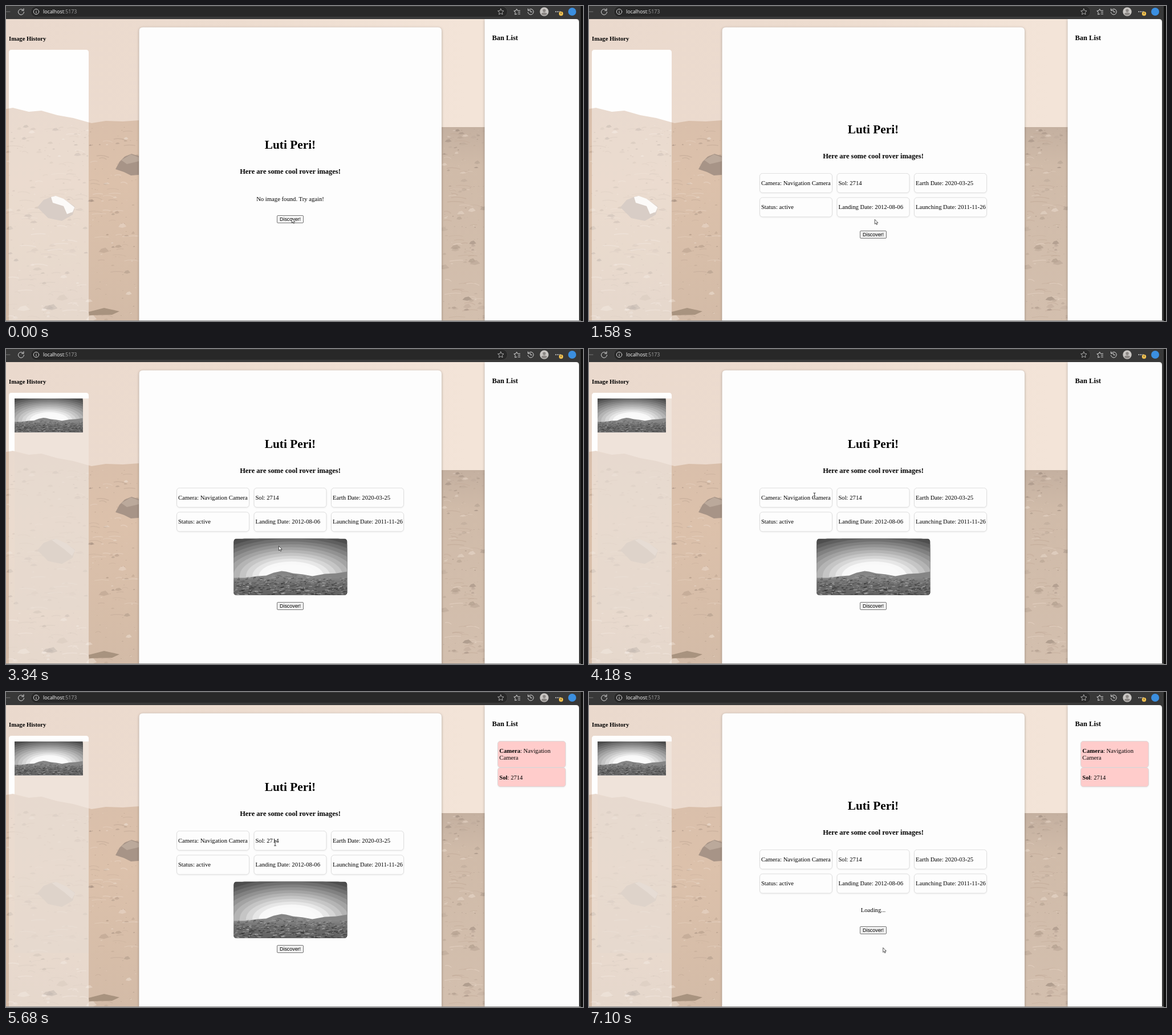
Write an HTML page that moves like this. It is 1012 px wide and 554 px high and loops after 8 s.

```html
<!DOCTYPE html>
<html lang="en">
<head>
<meta charset="utf-8">
<title>Rover images</title>
<style>
  html, body { margin: 0; width: 100%; height: 100%; overflow: hidden; background: #383838; }
  svg { display: block; width: 1012px; height: 554px; }
  text { font: 10.67px "Liberation Serif", "Times New Roman", serif; fill: #000; }
  .b { font-weight: bold; }
  .h1 { font-size: 21.33px; font-weight: bold; }
  .h3 { font-size: 12.48px; font-weight: bold; }
  .mid { text-anchor: middle; }
  .url { font: 8.8px "Open Sans", sans-serif; fill: #fff; }
  .btn { font: 8.89px "Liberation Sans", Arial, sans-serif; }
  .icon { fill: none; stroke: #d8d8d8; stroke-width: 1; stroke-linecap: round; stroke-linejoin: round; }
  .panel { filter: drop-shadow(0 1px 2px rgba(0, 0, 0, .28)); }
  .card { stroke: #d6d6d6; stroke-width: .8; filter: drop-shadow(0 1px 1px rgba(0, 0, 0, .06)); }
</style>
</head>
<body>
<svg viewBox="0 0 1012 554">
  <defs>
    <linearGradient id="sky">
      <stop offset="0" stop-color="#ead9cd"/>
      <stop offset=".4" stop-color="#eddccf"/>
      <stop offset=".8" stop-color="#f3e4d8"/>
    </linearGradient>
    <linearGradient id="soil" x2="0" y2="1">
      <stop offset="0" stop-color="#d9bfab"/>
      <stop offset=".35" stop-color="#dcc1ab"/>
      <stop offset="1" stop-color="#d3bba7"/>
    </linearGradient>
    <linearGradient id="plain" x2="0" y2="1">
      <stop offset="0" stop-color="#c4b0a0"/>
      <stop offset=".2" stop-color="#d0bba9"/>
      <stop offset="1" stop-color="#d3bfae"/>
    </linearGradient>
    <linearGradient id="dust" x2="0" y2="1">
      <stop offset="0" stop-color="#8a8a8a"/>
      <stop offset=".4" stop-color="#6c6c6c"/>
      <stop offset="1" stop-color="#626262"/>
    </linearGradient>
    <clipPath id="frame"><rect width="199" height="99.5" rx="5"/></clipPath>
    <clipPath id="thumb"><rect width="199" height="99.5"/></clipPath>
    <g id="photo"></g>
  </defs>

  <rect y="23" width="1005" height="531" fill="url(#sky)"/>
  <path d="M5 554V82Q5 77 10 77H140Q145 77 145 82V554Z" fill="#fdfdfd"/>
  <rect class="late" x="15" y="87" width="130" height="372" fill="#e3cfbf"/>
  <path d="M0 181L12 179L40 186L62 184L90 192L118 197L150 206L175 202L205 203L233 201V554H0Z" fill="url(#soil)"/>
  <rect x="764" y="213" width="76" height="341" fill="url(#plain)"/>
  <g id="rocks"></g>
  <path d="M192 287L199 274L208 265L220 260L233 264V297L219 298L207 292Z" fill="#a79487"/>
  <path d="M202 271L219 261L233 266V273L212 278Z" fill="#bba99b"/>
  <path d="M145 538L172 531L199 537L186 543L146 544Z" fill="#a8937f"/>
  <path d="M55 354L66 341L84 334L104 341L121 353L117 367L98 378L74 373Z" fill="#bba99c"/>
  <path d="M80 336L88 334L106 342L121 354L116 364L102 352Z" fill="#d5c8bd"/>
  <path d="M5 554V82Q5 77 10 77H140Q145 77 145 82V554Z" fill="#fff" opacity=".42"/>
  <path class="early" d="M79 336L87 334L101 339L120 354L117 362L107 366L101 352L82 346Z" fill="#fcfaf8"/>
  <path class="late" d="M15 182L40 186L62 184L90 192L118 197L145 205V459H15Z" fill="#e5d9cf" opacity=".5"/>
  <text class="b" x="5" y="60.5">Image History</text>
  <use class="late" href="#photo" transform="translate(15 87) scale(.602 .596)" clip-path="url(#thumb)"/>

  <path class="panel" d="M233.500 560V44Q233.500 37.500 240 37.500H757.500Q764 37.500 764 44V560Z" fill="#fdfdfd"/>
  <path class="panel" d="M839.500 560V23H1000Q1005 23 1005 28V560Z" fill="#fdfdfd"/>
  <text class="h3" x="852.500" y="60">Ban List</text>

  <g id="main">
    <text class="h1 mid" x="498.500" y="251.300">Luti Peri!</text>
    <text class="h3 mid" x="498.500" y="295">Here are some cool rover images!</text>
    <g id="facts"></g>
  </g>
  <text id="note" class="mid" x="498.500"></text>
  <g id="shot" transform="translate(399.300 333.500)"><use href="#photo" clip-path="url(#frame)"/></g>
  <g id="button">
    <rect x="475.500" y=".5" width="46" height="13" rx="1.500" stroke="#767676"/>
    <text class="btn mid" x="498.500" y="10">Discover!</text>
  </g>

  <g id="ban1">
    <rect class="card" x="862.500" y="86.500" width="119" height="46" rx="4.500" fill="#ffcccb"/>
    <text x="865.300" y="107"><tspan class="b">Camera</tspan>: Navigation</text>
    <text x="865.300" y="119">Camera</text>
  </g>
  <g id="ban2">
    <rect class="card" x="862.500" y="133" width="119" height="33.500" rx="4.500" fill="#ffcccb"/>
    <text x="865.300" y="153.500"><tspan class="b">Sol</tspan>: 2714</text>
  </g>

  <path d="M0 0H1012V554H1005V28Q1005 23 1000 23H0Z" fill="#383838"/>
  <rect x="1008" width="4" height="554" fill="#101010"/>
  <rect y="553" width="1008" height="1" fill="#8c8c8c"/>
  <rect x="43.500" y=".5" width="836" height="19" rx="9.500" fill="#282828" stroke="#4a4a4a" stroke-width=".7"/>
  <text class="url" x="65" y="13.200">localhost<tspan fill="#a8a8a8">:5173</tspan></text>
  <g class="icon">
    <path d="M-3 10H7M0 6L-4 10L0 14" stroke="#777"/>
    <path d="M30.500 7.500A5 5 0 1 0 31.500 10.500M31 4.500V8H27.500"/>
    <circle cx="53" cy="10" r="4.700"/>
    <path d="M53 9.500V12.500M53 7.500V7.600"/>
    <path d="M867.800 4.800L869.400 8.200L873 8.600L870.300 11.200L871 14.900L867.800 13L864.600 14.900L865.300 11.200L862.600 8.600L866.200 8.200Z" stroke="#aaa"/>
    <path d="M896 14L892.600 14.900L893.300 11.200L890.900 8.700L894.200 8.200L895.600 5L897.200 8.200H901.500M898.500 11H901.500M898.500 14H901.500"/>
    <path d="M916 7.500A5 5 0 1 1 915.300 11M915.500 4.800V8H918.700M920 7.500V10.500H922.500"/>
  </g>
  <circle cx="944" cy="10" r="7.700" fill="#c9c6c3"/>
  <path d="M939 14.500Q939 11.500 944 11.500Q949 11.500 949 14.500Q944 18.500 939 14.500Z" fill="#8b8784"/>
  <circle cx="944" cy="8" r="2.700" fill="#8b8784"/>
  <g fill="#ddd"><circle cx="964.500" cy="10" r="1"/><circle cx="968" cy="10" r="1"/><circle cx="971.500" cy="10" r="1"/></g>
  <circle cx="973.500" cy="13.500" r="3.700" fill="#f2c14e"/>
  <path d="M973.500 11.500V13.800M973.500 15.200V15.500" stroke="#333"/>
  <circle cx="993" cy="10" r="7" fill="#3b8fe0"/>

  <path id="arrow" d="M.4 .4V8.500L2.200 6.800L3.500 9.700L4.800 9.100L3.500 6.300H6.100Z" fill="#fff" stroke="#222" stroke-width=".75"/>
  <path id="beam" d="M-2 -4.500H2M0 -4.500V4.500M-2 4.500H2" fill="none" stroke="#333" stroke-width=".9"/>
</svg>
<script>
const LOOP = 8000;
const $ = id => document.getElementById(id);
const show = (el, on) => el.setAttribute('visibility', on ? 'visible' : 'hidden');
const move = (el, x, y) => el.setAttribute('transform', `translate(${x} ${y})`);

let seed = 11;
const rand = () => (seed = (seed * 16807) % 2147483647) / 2147483647;
const pick = list => list[Math.floor(rand() * list.length)];

// Scattered stones, larger toward the viewer
function stones(x0, x1, top, count, tones) {
  let out = '';
  for (let i = 0; i < count; i++) {
    const depth = rand() ** 1.2;
    const x = x0 + rand() * (x1 - x0), y = top + depth * (552 - top);
    const w = 1 + rand() ** 4 * (5 + depth * 6), h = w * (.3 + rand() * .3);
    out += `<path d="M${x - w} ${y + h * .6}L${x - w * .5} ${y - h * .6}L${x + w * .3} ${y - h}L${x + w} ${y + h * .4}L${x} ${y + h}Z" fill="${pick(tones)}" opacity="${.3 + rand() * .35}"/>`;
  }
  return out;
}

// Wind-blown ridges that slope gently across the sand
function ridges(x0, x1, top, count) {
  let out = '';
  for (let i = 0; i < count; i++) {
    const x = x0 + rand() * (x1 - x0 - 20), y = top + rand() * (550 - top);
    const w = 8 + rand() * 22, dy = rand() * 5 - 2;
    out += `<path d="M${x} ${y}q${w / 2} ${-2 - rand() * 2} ${w} ${dy}" fill="none" stroke="${pick(['#bda592', '#c3ab98', '#ebdacb'])}" stroke-width="${.8 + rand()}" opacity=".45"/>`;
  }
  return out;
}
$('rocks').innerHTML =
  ridges(0, 232, 215, 110) + ridges(765, 838, 225, 45) +
  stones(0, 231, 210, 300, ['#9f8b7d', '#ad9583', '#b9a18e', '#ebdccf']) +
  stones(766, 838, 216, 140, ['#9c8a7d', '#ad998a', '#bba797', '#e6d6c8']);

// Grey landscape with a banded sky
function landscape() {
  let out = '<rect width="199" height="100" fill="#484848"/>';
  for (let i = 0; i < 12; i++) {
    const k = 1.36 - i * .09, v = Math.min(250, 78 + i * 17);
    out += `<ellipse cx="101" cy="66" rx="${124 * k}" ry="${56 * k}" fill="rgb(${v},${v},${v})"/>`;
  }
  out += '<path d="M0 69L20 69L42 66L57 65L70 60L84 57L92 58L104 61L122 63L138 66L160 62L180 61L199 58V100H0Z" fill="#858585"/>' +
    '<path d="M0 72L50 70L110 69L150 69L199 67V100H0Z" fill="url(#dust)"/>';
  for (let i = 0; i < 420; i++) {
    const near = rand(), x = rand() * 199, y = 68 + near * 31, w = 1.5 + rand() * (3 + near * 5);
    out += `<path d="M${x} ${y}l${w} ${rand() * 2.4 - 1.5}" stroke="${pick(['#161616', '#262626', '#3a3a3a', '#a4a4a4', '#d6d6d6'])}" stroke-width="${.4 + rand() * (.4 + near * .7)}" opacity=".7"/>`;
  }
  for (let i = 0; i < 40; i++) {
    const x = 66 + rand() * 62;
    out += `<path d="M${x} ${63 + rand() * 5}l${2 + rand() * 6} 1" stroke="${pick(['#505050', '#a8a8a8'])}" stroke-width=".6" opacity=".6"/>`;
  }
  return out;
}
$('photo').innerHTML = landscape();

$('facts').innerHTML = [
  'Camera: Navigation Camera', 'Sol: 2714', 'Earth Date: 2020-03-25',
  'Status: active', 'Landing Date: 2012-08-06', 'Launching Date: 2011-11-26'
].map((label, i) => {
  const x = 299.5 + (i % 3) * 135.5, y = 321.4 + Math.floor(i / 3) * 42.5;
  return `<rect class="card" x="${x}" y="${y}" width="127" height="34" rx="5" fill="#fdfdfd"/>` +
    `<text x="${x + 2.4}" y="${y + 20.4}">${label}</text>`;
}).join('');

// Each row: start time, then values held until the next row
const layout = [ // heading shift, button y, note, note y
  [0, 0, 368, 'No image found. Try again!', 342.7],
  [550, 0, 368, 'Loading...', 342.7],
  [1430, -27, 395, '', 0],
  [1880, -77, 445, '', 0],
  [7100, -44, 412, 'Loading...', 386.5]
];
const fills = [
  [0, '#f5f5f5'], [150, '#eaeaea'], [280, '#e5e5e5'],
  [1580, '#efefef'], [6390, '#e3e3e3'], [7100, '#efefef']
];
const pointer = [ // shape, x, y
  [0, 'arrow', 500.8, 373], [280, 'arrow', 500.8, 375],
  [3340, 'arrow', 478, 346], [3470, 'arrow', 441, 304], [3600, 'arrow', 420, 279],
  [3750, 'arrow', 403, 263], [3880, 'beam', 394.5, 257], [4030, 'beam', 395.5, 258.5],
  [4180, 'beam', 395.5, 257.8], [4610, 'beam', 409, 257], [4730, 'beam', 437, 256.5],
  [4860, 'beam', 453, 257.8], [5010, 'beam', 464, 259], [5150, 'beam', 467, 261],
  [5270, 'beam', 468, 261.5], [5680, 'beam', 472, 265.8], [5820, 'arrow', 520, 401],
  [5970, 'arrow', 519.7, 427], [6110, 'arrow', 516, 438.5], [6250, 'arrow', 516, 443.5],
  [6390, 'arrow', 515.3, 446], [6530, 'arrow', 515.3, 447], [6680, 'arrow', 515.3, 448],
  [6820, 'arrow', 515.3, 448.7], [6960, 'arrow', 515.3, 449.3]
];
const at = (rows, t) => rows.findLast(row => row[0] <= t).slice(1);

const face = document.querySelector('#button rect');
const late = document.querySelectorAll('.late'), early = document.querySelectorAll('.early');

function draw(t) {
  const [shift, buttonY, note, noteY] = at(layout, t);
  move($('main'), 0, shift);
  move($('button'), 0, buttonY);
  $('note').textContent = note;
  $('note').setAttribute('y', noteY);
  face.setAttribute('fill', at(fills, t)[0]);

  show($('facts'), t >= 1430);
  show($('shot'), t >= 1880 && t < 7100);
  late.forEach(el => show(el, t >= 1880));
  early.forEach(el => show(el, t < 1880));
  show($('ban1'), t >= 4320);
  show($('ban2'), t >= 5150);

  const [shape, x, y] = at(pointer, t);
  for (const id of ['arrow', 'beam']) show($(id), id === shape);
  move($(shape), x, y);
}

const start = performance.now();
function tick() {
  draw((performance.now() - start) % LOOP);
  requestAnimationFrame(tick);
}
tick();
</script>
</body>
</html>
```
